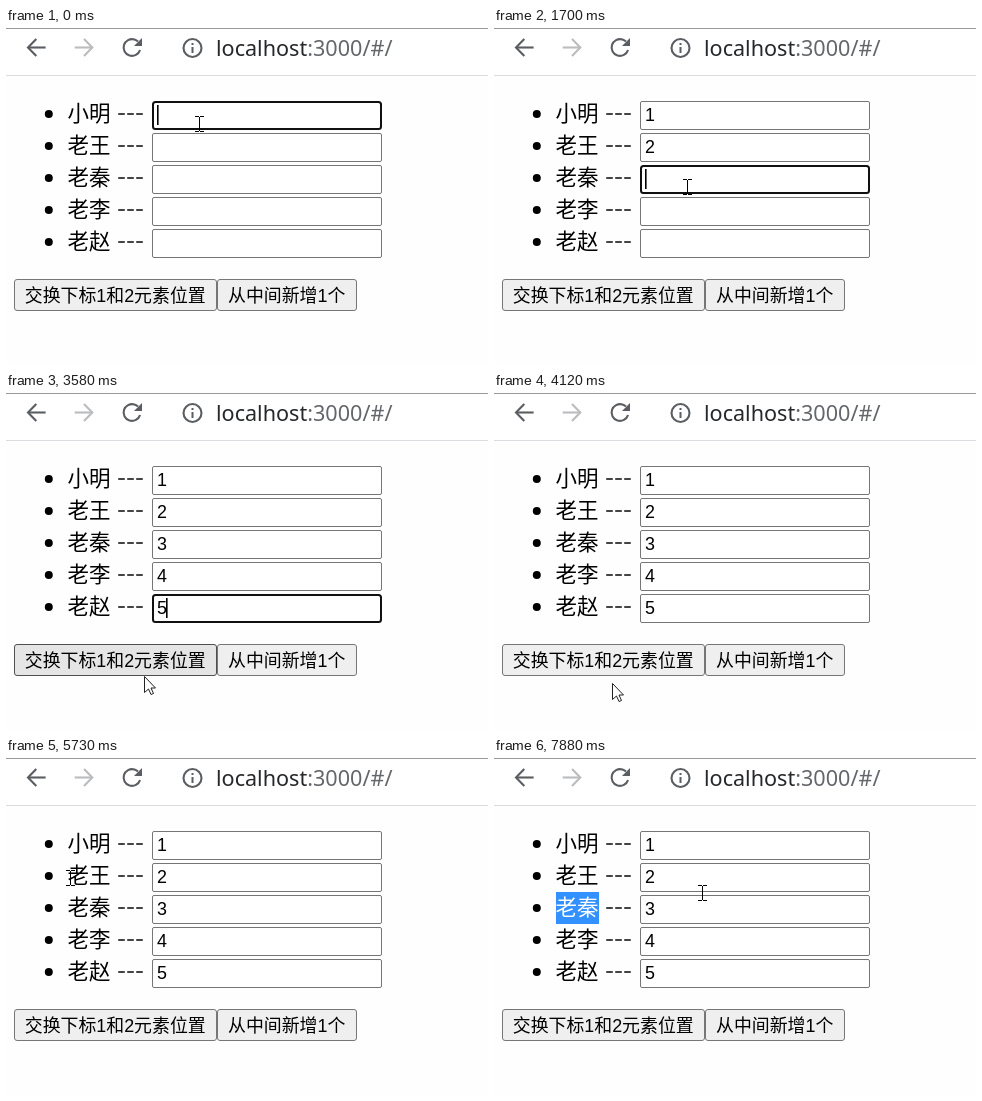
Animation of 482 by 337 pixels, one loop 8000 ms. Source, as an HTML page with a canvas:

```html
<!DOCTYPE html>
<html lang="zh-CN">
<head>
<meta charset="utf-8">
<style>
  html, body { margin: 0; width: 100%; height: 100%; overflow: hidden; background: #fefefe; }
  canvas { display: block; }
</style>
</head>
<body>
<canvas id="stage" width="482" height="337"></canvas>
<script>
const ctx = document.getElementById('stage').getContext('2d');
const LOOP = 8000, TICKS = 60;
const CJK = '"Noto Sans CJK SC", "Noto Sans CJK", "Noto Sans CJK JP", sans-serif';
const UI_FONT = '17.9px "Liberation Sans", ' + CJK;
const GLYPH = 21.5;
const NAME_FONT = GLYPH + 'px ' + CJK;
const NAMES = ['小明', '老王', '老秦', '老李', '老赵'];

// All action runs in ticks. Each field takes a fixed number of them.
const TICKS_PER_FIELD = 5, FIRST_TYPED = 4, FIRST_FOCUS = 2;
const LEAVE_FIELDS = FIRST_TYPED + TICKS_PER_FIELD * 4;
const BLUR = 29, DRAG = 44, SECOND_PICK = 53;

// Pointer after the fields: tick, x, y
const WAY = [
  [LEAVE_FIELDS, 193, 219], [27, 139, 283], [BLUR, 128, 297], [36, 96, 274],
  [39, 97, 273], [43, 64, 119], [48, 106, 125], [50, 106, 125],
  [SECOND_PICK, 98, 150], [58, 149, 146], [59, 208, 134]
];

const clamp = (v, lo, hi) => Math.max(lo, Math.min(hi, v));
const mix = (a, b, k) => Math.round(a + (b - a) * k);
const inside = (p, x, y, w, h) => p.x >= x && p.x <= x + w && p.y >= y && p.y <= y + h;

// Ticks are shown a little ahead of their nominal time
const tickAt = ms => Math.min(TICKS - 1, Math.floor(ms / LOOP * TICKS + 0.35));

function pointerAt(n) {
  if (n < LEAVE_FIELDS) {
    const phase = Math.max(0, n - FIRST_TYPED);
    const row = Math.floor(phase / TICKS_PER_FIELD);
    const move = n < FIRST_TYPED ? 0 : Math.min(1, phase % TICKS_PER_FIELD / 2);
    return { x: 193, y: Math.round(95 + 31.3 * (row + move)) };
  }
  const next = clamp(WAY.findIndex(p => p[0] > n), 0, WAY.length) || WAY.length - 1;
  const [n0, x0, y0] = WAY[next - 1], [n1, x1, y1] = WAY[next];
  const k = (n - n0) / (n1 - n0);
  return { x: mix(x0, x1, k), y: mix(y0, y1, k) };
}

function stateAt(n) {
  const pointer = pointerAt(n);
  return {
    pointer,
    typed: Math.floor((n - FIRST_TYPED) / TICKS_PER_FIELD) + 1,
    focus: n < BLUR ? clamp(Math.floor((n - FIRST_FOCUS) / TICKS_PER_FIELD), 0, 4) : -1,
    pickedRow: n < DRAG ? -1 : n < SECOND_PICK ? 1 : 2,
    pickedChars: clamp(Math.round((pointer.x - 62) / GLYPH), 0, 2)
  };
}

function text(str, x, y, font, color = '#000', align = 'left') {
  ctx.font = font;
  ctx.fillStyle = color;
  ctx.textAlign = align;
  ctx.fillText(str, x, y);
}

function box(x, y, w, h, radius, width, stroke, fill) {
  ctx.beginPath();
  ctx.roundRect(x + width / 2, y + width / 2, w - width, h - width, radius);
  ctx.fillStyle = fill;
  ctx.fill();
  ctx.lineWidth = width;
  ctx.strokeStyle = stroke;
  ctx.stroke();
}

function line(points, color) {
  ctx.beginPath();
  points.forEach(([x, y]) => ctx.lineTo(x, y));
  ctx.strokeStyle = color;
  ctx.lineWidth = 2.1;
  ctx.stroke();
}

function arc(x, y, r, from = 0, to = 7) {
  ctx.beginPath();
  ctx.arc(x, y, r, from, to);
}

function navArrow(x, dir, color) {
  const tip = x - 9.3 * dir;
  line([[tip + dir, 19.5], [x + 9.3 * dir, 19.5]], color);
  line([[x, 11], [tip + dir, 19.5], [x, 28]], color);
}

function drawToolbar() {
  const icon = '#5a5d61';
  ctx.fillStyle = '#fff';
  ctx.fillRect(0, 0, 482, 47);
  ctx.fillStyle = '#9a9a9a';
  ctx.fillRect(0, 0, 482, 1);
  ctx.fillStyle = '#dadce0';
  ctx.fillRect(0, 47, 482, 1);

  navArrow(30.3, 1, icon);
  navArrow(78, -1, '#bbbcbe');

  ctx.strokeStyle = ctx.fillStyle = icon;
  arc(126, 19.5, 8.4, 0.3, 5.5);
  ctx.stroke();
  ctx.beginPath();
  ctx.moveTo(136, 10);
  ctx.lineTo(136, 18);
  ctx.lineTo(128, 18);
  ctx.fill();

  arc(186.5, 20, 9);
  ctx.stroke();
  ctx.fillRect(185.5, 19, 2, 6);
  ctx.fillRect(185.5, 15, 2, 2);

  const font = '21.6px "Noto Sans", "Open Sans", sans-serif';
  text('localhost', 210, 28, font, '#26282b');
  text(':3000/#/', 210 + ctx.measureText('localhost').width, 28, font, '#63666a');
}

function drawRow(name, i, state) {
  const top = 73 + 32 * i, base = top + 20;
  arc(42.8, top + 13, 4);
  ctx.fillStyle = '#000';
  ctx.fill();
  text(name, 61.5, base, NAME_FONT);
  if (state.pickedRow === i) {
    ctx.save();
    ctx.beginPath();
    ctx.rect(62, top - 3, GLYPH * state.pickedChars, 32);
    ctx.clip();
    ctx.fillStyle = '#3390ff';
    ctx.fillRect(62, top - 3, 43, 32);
    text(name, 61.5, base, NAME_FONT, '#fff');
    ctx.restore();
  }
  text('---', 111, base, '25px "DejaVu Sans", sans-serif', '#444');

  const focused = state.focus === i, typed = state.typed > i;
  const hovered = inside(state.pointer, 146, top, 230, 28);
  if (focused) box(146, top, 230, 29, 2.5, 2, '#101010', '#fff');
  else box(146, top, 230, 29, 1.5, 1, hovered ? '#4f4f4f' : '#767676', '#fff');
  if (typed) text(i + 1, 151, top + 19.7, UI_FONT);
  if (focused) {
    ctx.fillStyle = '#000';
    ctx.fillRect(typed ? 160 : 151, top + 4, 1.6, 20);
  }
}

function drawButton(x, w, label, pointer) {
  const hovered = inside(pointer, x, 251, w - 1, 32);
  box(x, 251, w, 32, 2.5, 1, hovered ? '#4f4f4f' : '#767676', hovered ? '#e5e5e5' : '#efefef');
  text(label, x + w / 2 - 0.3, 274, UI_FONT, '#000', 'center');
}

function drawPointer({ x, y }) {
  ctx.fillStyle = '#000';
  if (y < 232) {
    ctx.fillRect(x, y - 6, 1, 14);
    for (const edge of [y - 7, y + 8]) {
      ctx.fillRect(x - 4, edge, 4, 1);
      ctx.fillRect(x + 1, edge, 4, 1);
    }
    return;
  }
  const arrow = new Path2D('M0 0V16L4 12.5L6.5 18L9 17L6.5 11.5H11Z');
  ctx.save();
  ctx.translate(x - 0.5, y + 0.5);
  ctx.fillStyle = '#fff';
  ctx.fill(arrow);
  ctx.strokeStyle = '#222';
  ctx.lineWidth = 1;
  ctx.stroke(arrow);
  ctx.restore();
}

function render() {
  const state = stateAt(tickAt(performance.now() % LOOP));
  ctx.fillStyle = '#fefefe';
  ctx.fillRect(0, 0, 482, 337);
  drawToolbar();
  NAMES.forEach((name, i) => drawRow(name, i, state));
  drawButton(8, 203, '交换下标1和2元素位置', state.pointer);
  drawButton(211, 140, '从中间新增1个', state.pointer);
  drawPointer(state.pointer);
  requestAnimationFrame(render);
}
render();
</script>
</body>
</html>
```
